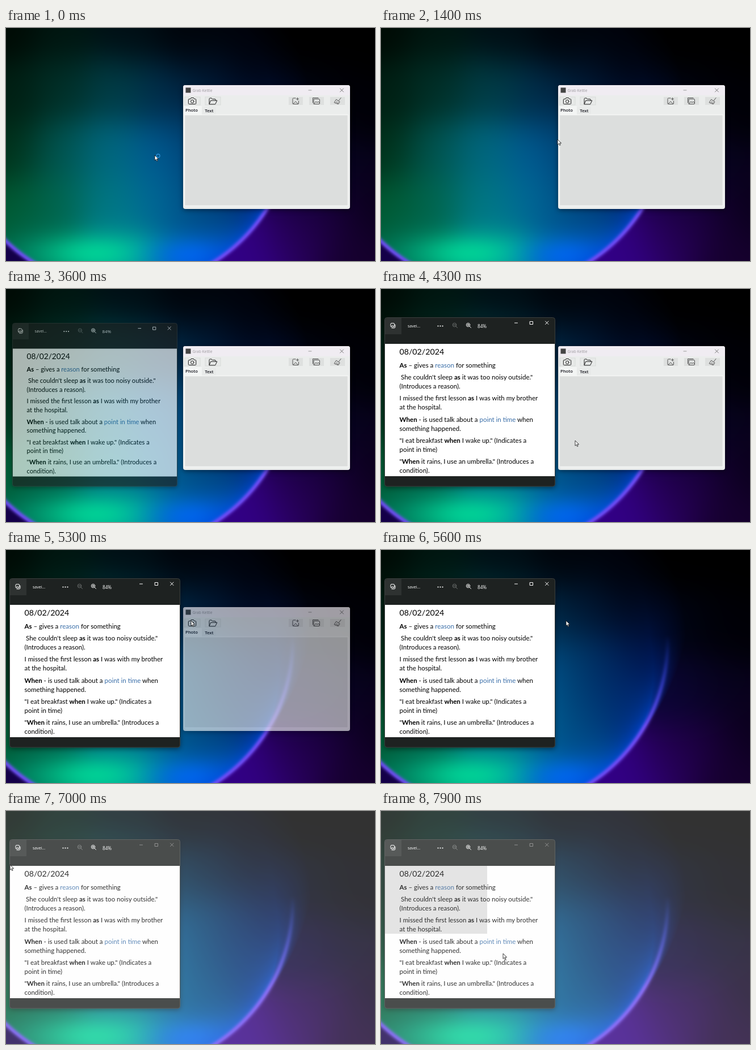
An HTML page with a canvas for the animation above (8000 ms loop, 650 px wide and 412 px high).

```html
<!DOCTYPE html>
<html lang="en">
<head>
<meta charset="utf-8">
<title>Screen clip demo</title>
<style>
  html, body { margin: 0; width: 100%; height: 100%; overflow: hidden; background: #000; }
  canvas, svg { position: absolute; left: 0; top: 0; width: 650px; height: 412px; }
  text { white-space: pre; }
  .ui { font-family: "Open Sans", sans-serif; }
  .page { font: 11.5px Lato, sans-serif; fill: #000; }
  .bold { font-weight: 700; }
  .link { fill: #3a6ea8; }
  .line { fill: none; stroke-width: 1; stroke-linecap: round; stroke-linejoin: round; }
  #clip, #photo { filter: drop-shadow(0 2px 4px rgba(0,0,0,.45)); }
</style>
</head>
<body>
<canvas id="wall" width="650" height="412"></canvas>
<svg viewBox="0 0 650 412">
  <g id="clip" class="ui">
    <rect x="312" y="101" width="294" height="219" rx="4" fill="#ebedec"/>
    <path d="M312 119v-14q0-4 4-4h286q4 0 4 4v14z" fill="#f0ecf2"/>
    <rect x="316.500" y="105.500" width="9" height="9" fill="#444"/>
    <text x="328.500" y="112.600" font-size="6.700" fill="#9a979c">Grab Kettle</text>
    <path class="line" stroke="#999" d="M533 110h5"/>
    <path class="line" stroke="#777" d="M588.500 107l6 6m0-6l-6 6"/>
    <g fill="#e7e9e8" stroke="#d4d6d5" stroke-width=".8">
      <rect x="315" y="122" width="27" height="14"/>
      <rect x="351" y="122" width="27" height="14"/>
    </g>
    <path d="M498 122h25v14h-25zM534 122h26v14h-26zM571 122h26v14h-26z" fill="#dee0df"/>
    <g class="line" stroke="#1c1c1c">
      <path d="M323 125.500h2l1-2h4.500l1 2h2q1.200 0 1.200 1.200v6.600q0 1.200-1.200 1.200h-11q-1.200 0-1.200-1.200v-6.600q0-1.200 1.700-1.200z"/>
      <circle cx="328.200" cy="129.800" r="2.700"/>
      <path d="M358 134v-8.500q0-1.500 1.500-1.500h2.500l1.500 1.700h4.500q1.200 0 1.200 1.300v1M358 134.500l2.800-6.300h11l-3 6.300z"/>
    </g>
    <g class="line" stroke="#555">
      <path d="M510 124h-3.500q-1.500 0-1.500 1.500v7.500q0 1.500 1.500 1.500h7.500q1.500 0 1.500-1.500v-4M506 134l4-4 4.500 4M513.500 123.500v4m-2-2h4"/>
      <path d="M542.500 125.500h8.500q1.500 0 1.500 1.500v6q0 1.500-1.500 1.500h-8.500zM540.500 132v-8.500h9.500M543 133.500l3-3.500 2 2 2-2 2.500 3"/>
      <path d="M590 123.500l-4 5M582 126.500l6 4-2.500 4-7-2.500zM583 130l-2 2.500m4-1l-1 2.500"/>
    </g>
    <path d="M313 138h32v15h-32z" fill="#f3f5f4"/>
    <path d="M345 140h25v13h-25z" fill="#e8eae9"/>
    <g font-size="7.700" font-weight="600" fill="#16161e">
      <text x="316" y="147.500">Photo</text>
      <text x="350.200" y="148.700">Text</text>
    </g>
    <rect x="314.500" y="153.500" width="288" height="161" fill="#dcdedd" stroke="#f5f6f5" stroke-width="1.500"/>
  </g>

  <g id="photo">
    <rect x="6.500" y="50.500" width="300" height="298.500" rx="4" fill="#1e2221" stroke="#3a3e3d"/>
    <path d="M7 80v-25q0-4 4-4h25v29z" fill="#2e3231"/>
    <g class="line" stroke="#fff">
      <rect x="17" y="60.500" width="6.500" height="6.500" rx="1.500"/>
      <path d="M17.500 66.500l2.800-2.500 2.700 2.500M25 63v4q0 2-2 2h-4"/>
      <circle cx="153.500" cy="63.500" r="3.200"/>
      <path d="M156 66l2.500 2.500M152 63.500h3m-1.500-1.500v3"/>
    </g>
    <g class="line" stroke="#707473">
      <circle cx="129.500" cy="63.500" r="3.200"/>
      <path d="M132 66l2.500 2.500M128 63.500h3"/>
    </g>
    <path id="buttons" class="line" d="M235.500 60h5M262.500 57.500h5v5h-5zM289.500 57l5.500 5.500m0-5.500l-5.500 5.500"/>
    <g fill="#fff" class="ui">
      <circle cx="100.500" cy="65.500" r="1.100"/><circle cx="104.500" cy="65.500" r="1.100"/><circle cx="108.500" cy="65.500" r="1.100"/>
      <text x="47" y="68" font-size="7">savei...</text>
      <text x="170" y="68.700" font-size="8.200">84%</text>
    </g>
    <path d="M7 97h299v234h-299z" fill="#fff"/>
    <g id="page" class="page"><text x="32.500" y="116" font-size="14.200">08/02/2024</text></g>
  </g>

  <rect id="veil" width="650" height="412" fill="#fafafa"/>
  <rect id="selection" x="7" y="97" fill-opacity=".1"/>
  <g id="cursor">
    <path d="M0 0v9.200l2.100-1.900 1.500 3.200 1.500-.7-1.500-3.100h3z" fill="#fff" stroke="#111" stroke-width=".8"/>
    <circle id="busy" cx="6" cy="1" r="3" fill="none" stroke="#2a8fd8" stroke-width="1.300"/>
  </g>
</svg>
<script>
const $ = id => document.getElementById(id);
const clamp = v => Math.min(1, Math.max(0, v));

// Page copy: *bold*, _link_
const copy = [
  [139, '*As* – gives a _reason_ for something'],
  [160, 'She couldn\'t sleep *as* it was too noisy outside."', 35],
  [176, '(Introduces a reason).'],
  [196.500, 'I missed the first lesson *as* I was with my brother'],
  [213, 'at the hospital.'],
  [235, '*When* - is used talk about a _point in time_ when'],
  [251, 'something happened.'],
  [272, '"I eat breakfast *when* I wake up." (Indicates a'],
  [288, 'point in time)'],
  [308.500, '"*When* it rains, I use an umbrella." (Introduces a'],
  [325, 'condition).']
];
$('page').innerHTML += copy.map(([y, s, x = 32.5]) => `<text x="${x}" y="${y}">` +
  s.replace(/\*(.+?)\*/g, '<tspan class="bold">$1</tspan>')
   .replace(/_(.+?)_/g, '<tspan class="link">$1</tspan>') + '</text>').join('');

// Wallpaper: soft colour points inside and outside a sphere, with glows near its rim
const inside = [
  [0, 0, 0x000a04], [100, 10, 0x001610], [210, 10, 0x000e14], [320, 20, 0x00040a], [430, 40, 0x00020a],
  [10, 120, 0x001e12], [100, 110, 0x003028], [190, 110, 0x003e48], [280, 120, 0x002c4a], [360, 110, 0x001834],
  [440, 120, 0x000a24], [10, 220, 0x003018], [95, 220, 0x005450], [180, 220, 0x006880], [270, 220, 0x005a94],
  [340, 200, 0x003e6e], [410, 200, 0x002660], [480, 190, 0x001048], [15, 320, 0x005a30], [90, 310, 0x006850],
  [180, 310, 0x007884], [270, 310, 0x006898], [350, 290, 0x004278], [430, 270, 0x002a70], [60, 390, 0x006450],
  [200, 390, 0x008090], [330, 370, 0x005090]
];
const outside = [
  [0, 410, 0x140048], [430, 405, 0x320086], [510, 375, 0x28005c], [555, 335, 0x1a003c], [615, 400, 0x16002e],
  [645, 320, 0x0a001c], [525, 250, 0x0a0638], [580, 240, 0x06021a], [515, 140, 0x000414], [600, 140, 0x000006],
  [640, 10, 0x000000], [540, 20, 0x000000]
];

function blend(points, x, y) {
  let r = 0, g = 0, b = 0, sum = 0;
  for (const [px, py, c] of points) {
    const w = Math.exp(-((x - px) ** 2 + (y - py) ** 2) / 3800);
    r += w * (c >> 16); g += w * (c >> 8 & 255); b += w * (c & 255); sum += w;
  }
  return [r / sum, g / sum, b / sum];
}
const mix = (a, b, u) => a.map((v, k) => v + (b[k] - v) * u);
const spot = (x, y, rx, ry) => Math.exp(-((x / rx) ** 2) - (y / ry) ** 2);

function wallColor(x, y) {
  const d = Math.hypot(x - 206, y - 161) - 298.5;
  const lit = clamp((y - 150) / 160), right = clamp((x - 220) / 140);
  const edge = clamp(.5 - d / (5 + 60 * (1 - lit)));
  let ball = blend(inside, x, y);
  ball = mix(ball, [0, 215, 150], .9 * spot(x - 160, y - 398, 115, 36));
  ball = mix(ball, [0, 105, 245], .85 * spot(x - 325, y - 402, 75, 34));
  ball = mix(ball, [0, 75, 235], .75 * lit * right * Math.exp(Math.min(d, 0) / 22));
  const color = mix(blend(outside, x, y), ball, edge);
  return mix(color, [40 + 75 * lit, 80, 250], .85 * lit * spot(d, 0, 4.5, 1));
}

function paintWall() {
  const ctx = $('wall').getContext('2d'), img = ctx.createImageData(650, 412);
  for (let y = 0, i = 0; y < 412; y++)
    for (let x = 0; x < 650; x++, i += 4) img.data.set([...wallColor(x, y), 255], i);
  ctx.putImageData(img, 0, 0);
}

// Pointer path: time, x, y
const path = [
  [0, 262, 225], [1000, 264, 224], [1400, 311, 197], [2000, 322, 290], [2700, 300, 416], [3500, 300, 425],
  [4300, 342, 268], [5000, 326, 125], [6100, 326, 125], [7000, 7, 95], [7100, 7, 97], [7800, 187, 217],
  [7900, 215, 252], [8000, 240, 280]
];
function pointer(t) {
  const n = path.findIndex(p => p[0] > t), [t0, x0, y0] = path[n - 1], [t1, x1, y1] = path[n];
  let u = (t - t0) / (t1 - t0);
  if (t < 7000) u *= u * (3 - 2 * u);
  return [x0 + (x1 - x0) * u, y0 + (y1 - y0) * u];
}

function draw(now) {
  const t = Math.floor(now % 8000 / 100) * 100;
  const open = clamp((t - 3400) / 300), veil = clamp((t - 5600) / 300);
  const scale = .9 + .1 * open;
  $('clip').setAttribute('opacity', 1 - clamp((t - 5200) / 300));
  $('photo').setAttribute('opacity', open);
  $('photo').setAttribute('transform', `translate(156 349) scale(${scale}) translate(-156 -349)`);
  $('buttons').setAttribute('stroke', veil ? '#777' : '#fff');
  $('veil').setAttribute('opacity', .2 * veil);
  $('cursor').setAttribute('transform', `translate(${pointer(t)})`);
  $('busy').setAttribute('opacity', t < 900 ? 1 : 0);
  // The selection trails the pointer by one step
  const [x, y] = t > 7200 ? pointer(t - 100) : [7, 97];
  $('selection').setAttribute('width', x - 7);
  $('selection').setAttribute('height', y - 97);
  requestAnimationFrame(() => draw(performance.now()));
}
paintWall();
draw(0);
</script>
</body>
</html>
```
